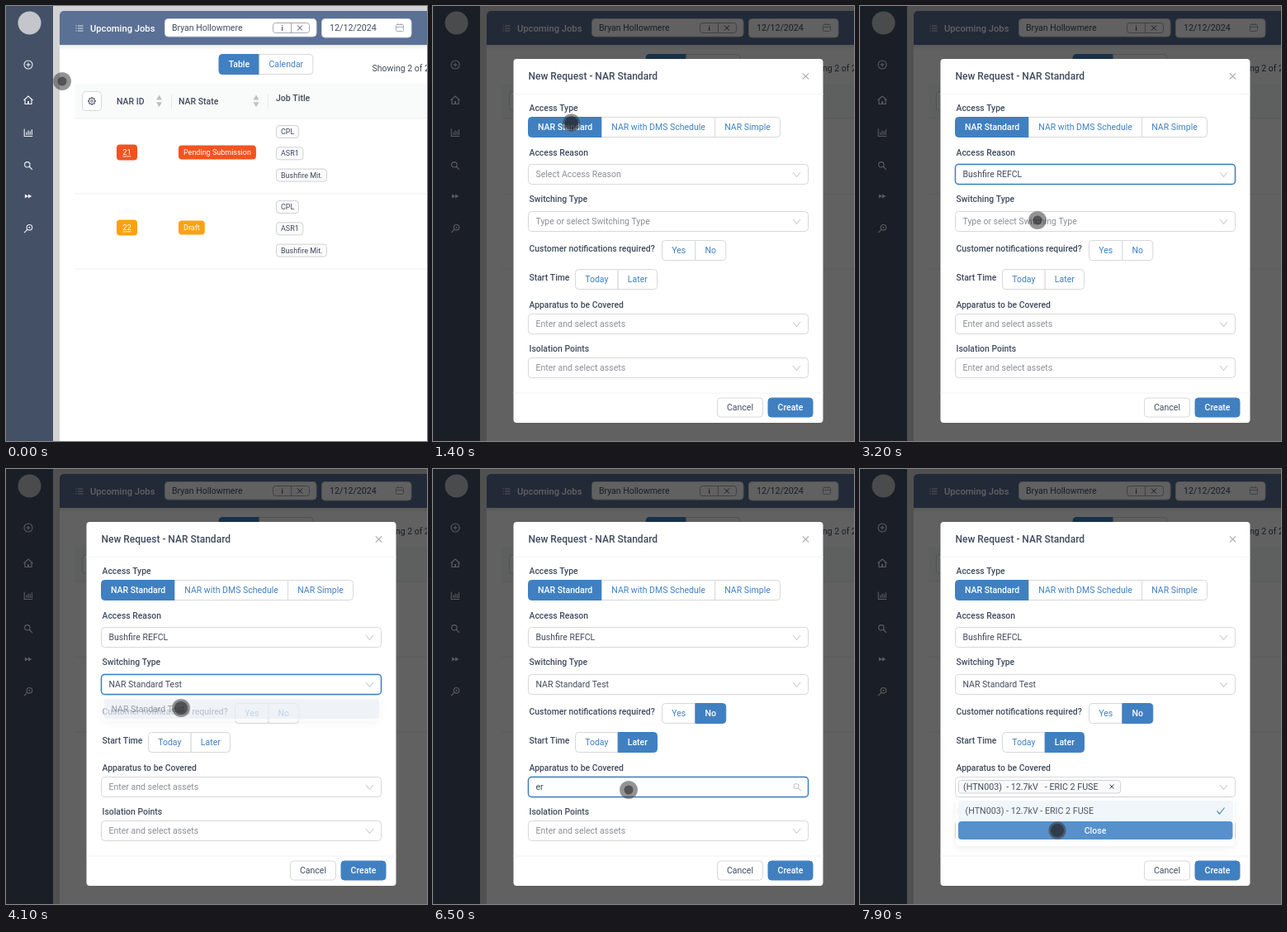
Recreate the animation shown at these times as an HTML page with a canvas. Size 510x526 px, loop 8000 ms.

```html
<!DOCTYPE html>
<html lang="en">
<head>
<meta charset="utf-8">
<title>New request form</title>
<style>
html, body { margin: 0; width: 510px; height: 526px; overflow: hidden; background: #fff; }
canvas { display: block; width: 510px; height: 526px; }
</style>
</head>
<body>
<canvas id="stage"></canvas>
<script>
const W = 510, H = 526, LOOP = 8000, STEP = 100, TRAVEL = 400, PRESS = 200;
const BLUE = '#4080c1', INK = '#414b5e', GREY = '#8b8f96', LINE = '#d6d8db', PALE = '#c9cbcf', ICON = '#eef0f4';
const cv = document.getElementById('stage');
const dpr = window.devicePixelRatio || 1;
cv.width = W * dpr;
cv.height = H * dpr;
const c = cv.getContext('2d');

const REASONS = ['Bushfire Mit.', 'Bushfire REFCL', 'Expanding or enhancing the network', 'Maintenance',
  'Network Augmentation', 'Reliability Improvement', 'Tree Clearing', 'Work near powerlines'];

// pointer targets: arrival time, x, y; each is clicked shortly after arrival
const STOPS = [
  [400, 26, 73], [1200, 160, 129], [1700, 209, 208], [2500, 196, 257], [3150, 215, 259], [3900, 212, 289],
  [4500, 336, 297], [5050, 253, 333], [5700, 237, 388], [7150, 238, 413], [7650, 239, 437]
];
const CLICKS = STOPS.map(s => s[0] + 100);
const [OPEN, TYPE, REASON, PICK, SWITCH, TEST, NO, LATER, ASSET, TAG, CLOSE] = CLICKS;

const ramp = (t, a, b) => Math.min(1, Math.max(0, (t - a) / (b - a)));
const ease = k => k * k * (3 - 2 * k);
const within = (t, a, b) => t >= a && t < b;
const visible = (t, a, b, d = 200) => ramp(t, a, a + d) * (1 - ramp(t, b, b + d));

function pointer(t) {
  let x = 68, y = 91;
  for (const [at, u, v] of STOPS) {
    const k = ease(ramp(t, at - TRAVEL, at));
    x += (u - x) * k;
    y += (v - y) * k;
  }
  const press = CLICKS.some(a => within(t, a, a + PRESS));
  disc(x, y, 10.8, 'rgba(48,48,48,.52)', 'rgba(150,150,150,.35)');
  disc(x, y, press ? 8 : 5.5, 'rgba(32,32,36,.55)');
}

function text(s, x, y, color = INK, size = 10.5, weight = 400, align = 'left') {
  c.font = `${weight} ${size}px Roboto, sans-serif`;
  c.textAlign = align;
  c.fillStyle = color;
  c.fillText(s, x, y + size * 0.355);
}

const label = (s, x, y, color = INK, size = 10.5) => text(s, x, y, color, size, 500);
const middle = (s, x, y, color, weight, size) => text(s, x, y, color, size, weight, 'center');

function width(s, size = 10.5) {
  c.font = `400 ${size}px Roboto, sans-serif`;
  return c.measureText(s).width;
}

function paint(fill, stroke, lw) {
  if (fill) { c.fillStyle = fill; c.fill(); }
  if (stroke) { c.strokeStyle = stroke; c.lineWidth = lw; c.stroke(); }
}

function box(x, y, w, h, r, fill, stroke, lw = 1) {
  c.beginPath();
  c.roundRect(x, y, w, h, r);
  paint(fill, stroke, lw);
}

function disc(x, y, r, fill, stroke, lw = 1) {
  c.beginPath();
  c.arc(x, y, r, 0, Math.PI * 2);
  paint(fill, stroke, lw);
}

function rect(x, y, w, h, fill) {
  c.fillStyle = fill;
  c.fillRect(x, y, w, h);
}

// open path through x, y pairs around an origin
function path(x, y, color, lw, ...p) {
  c.beginPath();
  for (let i = 0; i < p.length; i += 2) c.lineTo(x + p[i], y + p[i + 1]);
  paint(null, color, lw);
}

function tri(x, y, size, angle, fill) {
  c.beginPath();
  for (let i = 0; i < 3; i++) {
    const a = angle + i * Math.PI * 2 / 3;
    c.lineTo(x + size * Math.cos(a), y + size * Math.sin(a));
  }
  paint(fill);
}

function cross(x, y, r, color, lw = 1) {
  for (const s of [-1, 1]) path(x, y, color, lw, -r, -r * s, r, r * s);
}

function lens(x, y, r, color, side = 1) {
  disc(x, y, r, null, color, 1.1);
  path(x, y, color, 1.2, side * r * .7, r * .7, side * r * 1.9, r * 1.9);
}

function faded(alpha, show) {
  if (alpha <= 0) return;
  c.save();
  c.globalAlpha = alpha;
  show();
  c.restore();
}

function sidebar() {
  rect(0, 0, 57, H, '#435066');
  disc(28.5, 20.5, 14, '#c3c6cb');
  disc(27, 71, 5, null, ICON, 1.1);
  path(27, 71, ICON, 1.1, -2.5, 0, 2.5, 0);
  path(27, 71, ICON, 1.1, 0, -2.5, 0, 2.5);
  path(27, 114, ICON, 1.2, -5.5, 0, 0, -5, 5.5, 0);
  path(27, 114, ICON, 1.2, -4, -1, -4, 4.5, 4, 4.5, 4, -1);
  path(27, 116.5, ICON, 1.8, 0, -1.5, 0, 2);
  path(27, 153, ICON, 1.1, -4.8, -4.5, -4.8, 4.5, 5.2, 4.5);
  for (let i = 0; i < 4; i++) path(24.8 + i * 2.2, 156, ICON, 1.1, 0, 0, 0, -3.5 - 1.5 * (i % 2) - i * .6);
  lens(25.8, 191.8, 3.2, ICON);
  for (const x of [24.3, 28.4]) tri(x, 230, 2.9, 0, ICON);
  lens(28.4, 267.8, 3.3, ICON, -1);
  disc(28.4, 267.8, 1, ICON);
}

function header() {
  rect(57, 0, W - 57, H, '#d3d3d4');
  box(65, 6, 460, 540, [5, 0, 0, 0], '#fff');
  for (let i = 0; i < 6; i++) rect(65, 47 + i, W - 65, 1, `rgba(0,0,0,${.08 - i * .015})`);
  box(65, 6, 460, 41, [5, 0, 0, 0], '#5b7095');
  for (const y of [24, 27, 30]) {
    rect(84.5, y - .5, 1.2, 1, '#dfe4ec');
    rect(87, y - .5, 6.5, 1, '#dfe4ec');
  }
  label('Upcoming Jobs', 102, 27, '#fff', 11.2);
  box(192.5, 15.5, 183.5, 21.5, 4, '#fff', '#cfd5df');
  text('Bryan Hollowmere', 201, 26.5);
  box(323.5, 20.5, 44, 12, 3, '#fff', '#a5a9b0');
  rect(345, 20.5, 1, 12, '#a5a9b0');
  middle('i', 334.5, 26.5, INK, 500, 8.5);
  cross(356, 26.5, 3, INK);
  box(382.5, 15.5, 108.5, 22.5, 4, '#fff', '#cfd5df');
  text('12/12/2024', 392, 26.5, INK, 10.7);
  box(472.5, 22.5, 9, 8, 1, null, '#a9adb4');
  rect(472.5, 25, 9, 1, '#a9adb4');
  for (const x of [474.5, 478.5]) rect(x, 21, 1, 2.5, '#a9adb4');
}

function gear(x, y) {
  disc(x, y, 3.7, null, INK);
  disc(x, y, 1.4, null, INK, .8);
  for (let a = 0; a < 6.2; a += Math.PI / 4) disc(x + 4.3 * Math.cos(a), y + 4.3 * Math.sin(a), .7, INK);
}

function table() {
  group(258, 58.5, ['Table', 'Calendar'], 'Table');
  text('Showing 2 of 2', 443.5, 75.5);
  rect(83, 94, W - 83, 42, '#f9fafa');
  for (let i = 0; i < 3; i++) rect(83, 135.5 + i * 91, W - 83, 1, '#eeeff1');
  box(92.5, 103.5, 23, 23, 4, '#fff', LINE);
  gear(104, 115);
  label('NAR ID', 134, 115);
  label('NAR State', 209, 115);
  label('Job Title', 327, 111.5);
  for (const x of [185.5, 303]) for (const s of [-1, 1]) tri(x, 114.8 + s * 3.4, 4, s * Math.PI / 2, '#bcbfc4');
  for (const x of [200, 317]) rect(x, 107, 1, 17, '#e8e9eb');
  row(177, '21', 'Pending Submission', '#f2541f');
  row(268, '22', 'Draft', '#faa214');
}

function row(y, id, state, color) {
  box(134, y - 9.5, 25, 19, 4, color);
  middle(id, 146.5, y, '#fff', 400, 9.5);
  rect(141.5, y + 4.5, 10, .8, '#fff');
  box(209, y - 8.5, width(state, 9) + 12, 17, 4, color);
  text(state, 215, y, '#fff', 9);
  ['CPL', 'ASR1', 'Bushfire Mit.'].forEach((s, i) => {
    const ty = y - 25 + i * 26.3;
    box(327.5, ty - 7.5, width(s, 9) + 10.5, 15, 3.5, '#fbfbfb', '#cfd1d4');
    text(s, 333, ty, INK, 9);
  });
}

// segmented buttons, each as wide as its label plus padding
function group(x, y, items, chosen) {
  const h = 24, last = items.length - 1;
  items.forEach((s, i) => {
    const on = s === chosen, l = i ? 0 : 4, r = i < last ? 0 : 4, w = width(s) + 23.4;
    box(x, y, w, h, [l, r, r, l], on ? BLUE : '#fff', on ? BLUE : LINE);
    middle(s, x + w / 2, y + h / 2, on ? '#fff' : BLUE, on ? 500 : 400);
    x += w;
  });
}

function field(y, value, hint, focus, search) {
  if (focus) box(114.5, y - 13.5, 341, 27, 5, 'rgba(64,128,193,.14)');
  box(115.5, y - 12, 339, 24, 4, '#fff', focus ? BLUE : LINE, focus ? 1.5 : 1);
  text(value || hint, 124.5, y, value ? INK : GREY);
  if (search) lens(440, y - 1, 3, PALE);
  else path(440.5, y, PALE, 1.1, -4.5, -2.5, 0, 3, 4.5, -2.5);
}

function panel(y, h) {
  c.save();
  c.shadowColor = 'rgba(0,0,0,.08)';
  c.shadowBlur = 8 * dpr;
  c.shadowOffsetY = 2 * dpr;
  box(116, y, 338, h, 5, '#fff');
  c.restore();
}

function options(top, list, hot) {
  panel(top, list.length * 24 + 7);
  list.forEach((s, i) => {
    const y = top + 16 + i * 24;
    if (i === hot) box(119, y - 12, 333, 24, 3, '#e5ecf5');
    text(s, 127.5, y);
  });
}

function form(t) {
  const name = (s, y) => label(s, 116.5, y, INK, 10.4);
  name('Access Type', 123);
  name('Access Reason', 177);
  name('Switching Type', 233);
  name('Customer notifications required?', 293.5);
  name('Start Time', 328.5);
  name('Apparatus to be Covered', 361.5);
  name('Isolation Points', 414.5);

  const typing = within(t, ASSET, TAG), picked = t >= TAG;
  const typed = 'eric'.slice(0, Math.floor(Math.max(0, t - 6300) / 100));
  field(203.5, t >= PICK && REASONS[1], 'Select Access Reason', within(t, REASON, SWITCH));
  field(260.5, t >= TEST && 'NAR Standard Test', 'Type or select Switching Type', within(t, SWITCH, NO));
  group(277.5, 283.5, ['Yes', 'No'], t >= NO && 'No');
  group(172.5, 318.5, ['Today', 'Later'], t >= LATER && 'Later');
  field(384.5, picked ? ' ' : typed, 'Enter and select assets', within(t, ASSET, CLOSE), typing);
  field(437.5, '', 'Enter and select assets');
  if (picked) {
    box(119.5, 376.5, 196, 15.5, 3, '#fafafa', '#cfd1d4');
    text('(HTN003)  - 12.7kV   - ERIC 2 FUSE', 125, 384.5, INK, 10.7);
    cross(305, 384, 2.5, INK);
  }

  faded(visible(t, REASON, PICK), () => options(217, REASONS, t < PICK - 200 ? 0 : 1));
  faded(visible(t, SWITCH, TEST), () => options(274, ['NAR Standard Test'], 0));
  faded(visible(t, 6700, CLOSE + 130, 300), () => assets(t, picked));
}

function assets(t, picked) {
  panel(398, 58);
  if (t >= TAG - 100) box(119, 401, 333, 24, 3, '#f1f6fa');
  text('(HTN003) - 12.7kV - ERIC 2 FUSE', 127.5, 413.5, INK, 10.7);
  if (picked) path(437, 413.5, BLUE, 1.2, -4.5, 0, -1.5, 3.5, 4.5, -4);
  box(119, 426, 332.5, 22, 4, '#4a8ac9');
  middle('Close', 285, 437, '#fff', 500);
}

function modal(t) {
  const full = t >= TYPE, h = full ? 440 : 131, foot = 64 + h - 18.5;
  const grow = ramp(t, OPEN - 50, OPEN + 270), k = 1 - .8 * (1 - grow) ** 3;
  c.save();
  c.globalAlpha = Math.min(1, grow * 1.3);
  c.translate(27, 71);
  c.scale(k, k);
  c.translate(-27, -71);
  box(97.5, 64, 375, h, 4, '#fff');
  for (const y of [106, foot - 18]) rect(97.5, y, 375, 1, '#f3f4f5');
  label('New Request' + (full ? ' - NAR Standard' : ''), 115.5, 85, INK, 12);
  cross(451.5, 85, 3.7, '#a6a9af', 1.1);
  group(115.5, full ? 134.5 : 116.5, ['NAR Standard', 'NAR with DMS Schedule', 'NAR Simple'], full && 'NAR Standard');
  box(344.5, foot - 11.5, 55, 23, 4, '#fff', LINE);
  middle('Cancel', 372, foot);
  box(406, foot - 11.5, 54, 23, 4, full ? BLUE : '#f3f3f4', full ? BLUE : LINE);
  middle('Create', 433, foot, full ? '#fff' : '#a8abb0', full ? 500 : 400);
  if (full) form(t);
  c.restore();
}

function tooltip() {
  box(66, 61, 73.5, 24.5, 4, 'rgba(22,22,24,.94)');
  middle('New Request', 102.7, 73.5, '#fff', 500);
}

function draw(t) {
  c.setTransform(dpr, 0, 0, dpr, 0, 0);
  header();
  table();
  sidebar();
  faded(.62 * ramp(t, OPEN - 50, OPEN + 150), () => rect(0, 0, W, H, '#000'));
  if (t >= OPEN) modal(t);
  faded(visible(t, 250, 850), tooltip);
  pointer(t);
}

const start = performance.now();
function tick() {
  const t = (performance.now() - start) % LOOP;
  draw(Math.floor(t / STEP) * STEP);
  requestAnimationFrame(tick);
}
tick();
</script>
</body>
</html>
```
